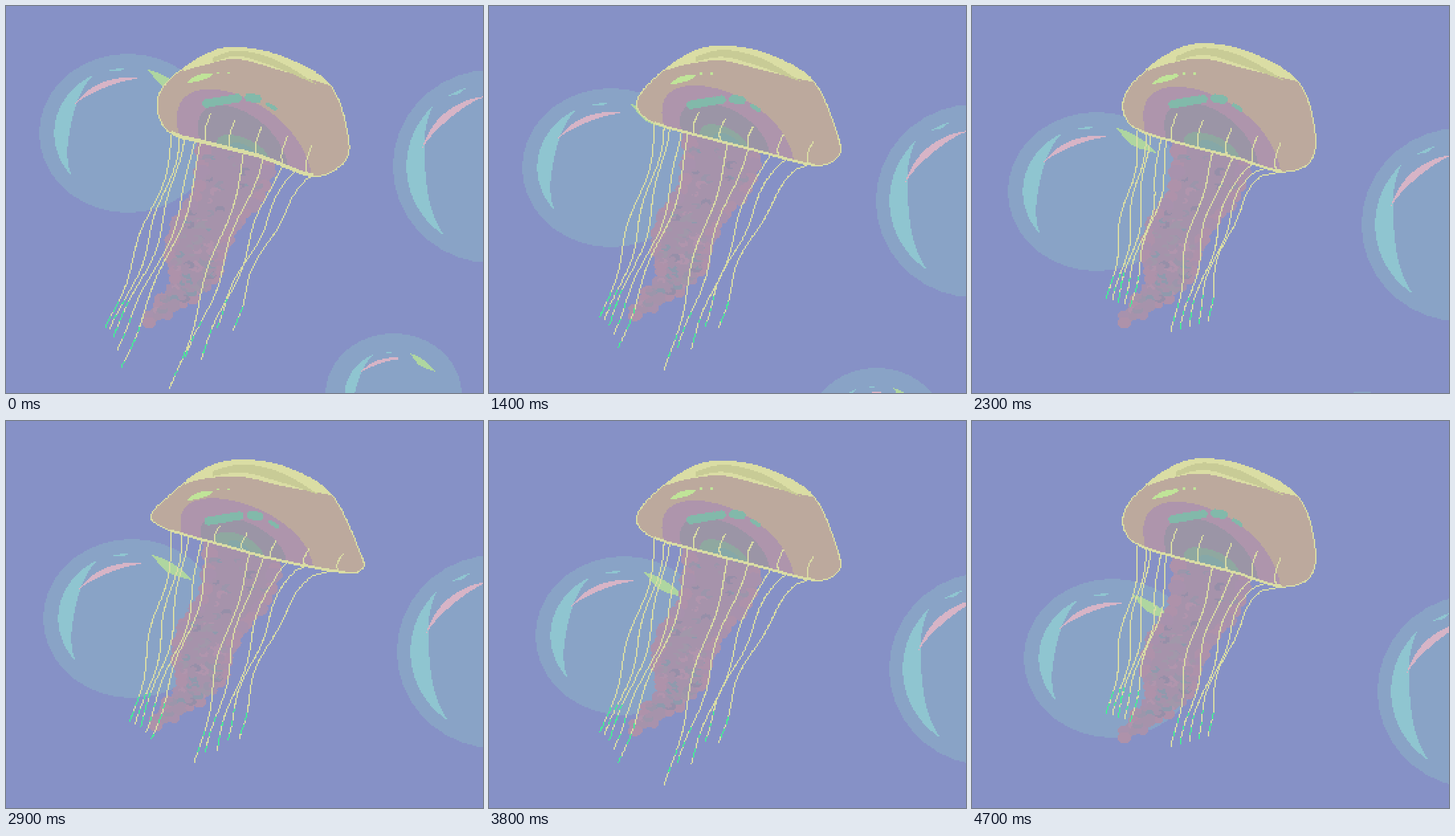
These frames come from a looping animation (720 by 584 pixels, 4.72 s). An HTML page with a canvas:

```html
<!DOCTYPE html>
<html lang="en">
<head>
<meta charset="utf-8">
<title>Jellyfish</title>
<style>
html, body { margin: 0; width: 100%; height: 100%; overflow: hidden; background: #8691c6; }
canvas { display: block; width: 100vw; height: 100vh; image-rendering: pixelated; }
</style>
</head>
<body>
<canvas width="360" height="292"></canvas>
<script>
const ctx = document.querySelector('canvas').getContext('2d');
const CELL = 2, LOOP = 4720, STEP = 100, STROKE = 12, SUB = 8;
const YELLOW = '#dadda4', TEAL = '#82b9aa', LIME = '#c0e498', CYAN = '#8fc5d0', PINK = '#d7b4c6', GREEN = '#afd6a0';
const { sin, cos, PI, min, max, floor, ceil, round, abs } = Math;

const points = s => s.split(' ').map(p => p.split(',').map(Number));
const mix = (a, b, f) => Array.isArray(a) ? a.map((v, i) => mix(v, b[i], f)) : a + (b - a) * f;
const range = (n, f) => Array.from({ length: n }, (_, i) => f(i));
const along = (path, t) => path[round(max(0, min(1, t)) * (path.length - 1))];

// Catmull-Rom curve, SUB samples per span
function smooth(pts, closed) {
  const n = pts.length, out = [];
  const at = i => closed ? pts[(i + n) % n] : pts[max(0, min(n - 1, i))];
  for (let i = 0; i < (closed ? n : n - 1); i++) {
    const [a, b, c, d] = [at(i - 1), at(i), at(i + 1), at(i + 2)];
    for (let k = 0; k < SUB; k++) {
      const t = k / SUB;
      out.push([0, 1].map(j => b[j] + t / 2 * (c[j] - a[j] +
        t * (2 * a[j] - 5 * b[j] + 4 * c[j] - d[j] + t * (3 * (b[j] - c[j]) + d[j] - a[j])))));
    }
  }
  if (!closed) out.push(pts[n - 1]);
  return out;
}

// Hard-edged scanline fill
function fill(pts, color) {
  ctx.fillStyle = color;
  const ys = pts.map(p => p[1] / CELL);
  const end = min(291, ceil(max(...ys)));
  for (let y = max(0, floor(min(...ys))); y <= end; y++) {
    const row = (y + .5) * CELL, xs = [];
    pts.forEach(([x, py], i) => {
      const [qx, qy] = pts[(i + 1) % pts.length];
      if (py <= row !== qy <= row) xs.push(round((x + (row - py) / (qy - py) * (qx - x)) / CELL));
    });
    xs.sort((a, b) => a - b);
    for (let i = 0; i + 1 < xs.length; i += 2) ctx.fillRect(xs[i], y, xs[i + 1] - xs[i], 1);
  }
}

function line(pts, colorAt, thick = 1) {
  for (let i = 0; i + 1 < pts.length; i++) {
    const [[x, y], [u, v]] = [pts[i], pts[i + 1]];
    const n = max(1, ceil(max(abs(u - x), abs(v - y)) / CELL));
    ctx.fillStyle = colorAt ? colorAt(i / pts.length, i) : YELLOW;
    for (let k = 0; k <= n; k++) {
      const [cx, cy] = mix([x, y], [u, v], k / n);
      ctx.fillRect(floor(cx / CELL), floor(cy / CELL) - thick + 1, 1, thick);
    }
  }
}

const oval = (x, y, rx, ry, color) =>
  fill(range(36, i => [x + rx * cos(i * PI / 18), y + ry * sin(i * PI / 18)]), color);

function bar(a, b, r, color) {
  for (let k = 0; k <= 8; k++) oval(...mix(a, b, k / 8), r, r, color);
}

// Bubbles: gleams are crescents given by two angles, a radius and a width
const gleams = [
  { from: 140, to: 242, r: .83, w: .18, color: CYAN },
  { from: 255, to: 268, r: .82, w: .03, color: CYAN },
  { from: 211, to: 281, r: .7, w: .07, color: PINK },
  { from: 285, to: 325, r: .83, w: .12, color: GREEN }
];
const bubbles = [
  { x: 184, y: 192, rx: 134, ry: 120, turn: 0, inset: 1 },
  { x: 734, y: 242, rx: 150, ry: 146, turn: -16, inset: 1.04 },
  { x: 585, y: 586, rx: 103, ry: 92, turn: 4, inset: .86 }
];
const driftTimes = [0, 7, 14, 23, 29, 38, 47];
const driftPath = points('0,0 2,16 0,52 4,88 6,106 20,132 28,166');

function driftAt(t) {
  const i = driftTimes.findLastIndex((k, j) => k <= t && j < driftTimes.length - 1);
  const f = (t - driftTimes[i]) / (driftTimes[i + 1] - driftTimes[i]);
  return mix(driftPath[i], driftPath[i + 1], f).map(v => round(v / CELL) * CELL);
}

function drawBubble({ x, y, rx, ry, turn, inset }, [dx, dy]) {
  oval(x + dx, y + dy, rx, ry, '#89a3c6');
  for (const { from, to, r, w, color } of gleams) {
    const edge = depth => range(25, i => {
      const a = (mix(from, to, i / 24) + turn) * PI / 180, q = (r - depth * sin(i * PI / 24)) * inset;
      return [x + dx + rx * q * cos(a), y + dy + ry * q * sin(a)];
    });
    fill([...edge(0), ...edge(w).reverse()], color);
  }
}

// The bell blends between three outlines, clockwise from the left end of the cap
const rest = points('240,118 300,74 348,63 418,77 490,120 517,200 508,238 462,257 388,230 310,210 250,193 229,158');
const wide = points('244,115 300,72 355,59 425,71 492,112 535,200 538,222 510,229 412,211 326,188 250,166 219,145');
const tall = points('240,122 290,68 350,46 420,57 497,102 519,165 514,230 475,236 408,227 314,202 250,175 226,157');

// One stroke: the bell opens, snaps tall and settles, while the threads gather
function poseAt(p) {
  const open = p < 7 ? sin(PI / 2 * p / 5) : 0;
  const lift = p < 7 ? 0 : 1 - (p - 7) / 6;
  const gather = 1 - (1 - p / 11) ** 2;
  const keys = rest.map((pt, i) => pt.map((v, j) => v + open * (wide[i][j] - v) + lift * (tall[i][j] - v)));
  const bell = smooth(keys, true);
  return { open, lift, gather, keys, bell, rim: bell.slice(7 * SUB, 10 * SUB + 1).reverse() };
}

let seed = 7;
const rand = () => (seed = seed * 16807 % 2147483647) / 2147483647;
const shades = ['#968fa8', '#9c96ab', '#b095ad', '#8f9aad', '#a198aa'];
const mottles = range(75, i => ({
  u: rand() * .92, v: .12 + rand() * .76, r: 4 + rand() * 6, tilt: rand() * 2 * PI, color: shades[i % 5]
}));
const spineKeys = points('350,205 338,280 302,330 286,375 281,418 216,478');

function drawArms({ open, gather }) {
  const spine = smooth(spineKeys.map(([x, y]) => [x + 14 * gather, y - 18 * open]));
  const at = (u, v) => {
    const [x, y] = along(spine, u);
    return [x + (2 * v - 1) * (56 * (1 - u ** 1.5) ** .5 + 2), y];
  };
  const base = '#a693ab';
  const edge = v => range(41, i => at(i / 40, v));
  fill([...edge(0), ...edge(1).reverse()], base);
  for (let i = 0; i <= 22; i++) {
    const u = i / 22, size = 12 - 4 * u + 2 * sin(i * 2.4);
    for (const v of [.06, .94]) oval(...at(u, v), size, size * .85, i % 3 ? '#ae92aa' : '#a892ad');
  }
  for (const { u, v, r, tilt, color } of mottles) {
    const [x, y] = at(u, v);
    oval(x, y, r, r * .7, color);
    oval(x + r * .5 * cos(tilt), y + r * .5 * sin(tilt), r * .7, r * .45, base);
  }
}

function drawBell({ open, lift, keys, bell, rim }) {
  const span = (a, b) => bell.slice(a * SUB, b * SUB + 1);
  const center = .55 - .1 * open, width = rim.at(-1)[0] - rim[0][0];

  function dome(half, height, color) {
    const from = center - half / width, to = center + half / width;
    const a = along(rim, from), b = along(rim, to);
    const arch = range(33, i => {
      const [x, y] = mix(a, b, (1 - cos(i * PI / 32)) / 2), s = abs(sin(i * PI / 32)) ** .8;
      return [x - .22 * height * s, y - height * s];
    });
    fill([...arch, ...range(12, i => along(rim, mix(to, from, i / 11)))], color);
  }

  fill(bell, '#bca99d');
  const drop = 17 + 8 * open + 15 * lift;
  const fold = [mix(keys[0], keys[1], .45), [keys[1][0], keys[1][1] + 15],
    [keys[2][0], keys[2][1] + drop], [keys[3][0] - 8, keys[3][1] + drop + 2], keys[4]];
  fill([...span(0, 4).slice(4), ...smooth(fold).reverse()], YELLOW);
  const band = f => smooth([1, 2, 3, 4].map(i => mix(keys[i], fold[i], f)).map(([x, y], i) => [x + 12 - 10 * i, y]));
  fill([...band(.25), ...band(.75).reverse()], '#c8cb96');

  dome(97, 97 - 22 * open - 8 * lift, '#ae95ac');
  dome(64, 73 - 24 * open, '#9b95a6');
  dome(37, 26 + 6 * lift, '#8fa8a0');
  dome(18, 15 + 8 * lift, '#86a8a8');
  line([...bell, bell[0]]);
  line(rim, null, round(3 - open - 2 * lift));

  const dy = 4 * max(open, lift), dx = 3 * open;
  bar([303 + dx, 147 + dy], [349 + dx, 139 + dy], 6.5, TEAL);
  bar([367 + dx, 138 + dy], [379 + dx, 140 + dy], 6.5, TEAL);
  bar([395 + dx, 148 + dy], [406 + dx, 155 + dy], 3, TEAL);
  fill(smooth(points('273,116 290,104 311,102 302,110').map(([x, y]) => [x, y + dy]), true), LIME);
  for (const x of [320, 336]) oval(x, 101 + dy / 2, 2.2, 2, LIME);

  for (let k = 0; k < 5; k++) {
    const [x, y] = along(rim, .28 + .17 * k), h = 44 - 17 * open - 6 * lift;
    line(smooth([[x + 7, y - h], [x - 1, y - h * .45], [x, y]]));
  }
}

function drawThread(root, tip, power, k) {
  const path = range(41, i => {
    const u = i / 40;
    return [mix(root[0], tip[0], u ** power) + 7 * sin(PI * u) * sin(9 * u + 1.3 * k), mix(root[1], tip[1], u)];
  });
  line(path, (f, i) => f > .8 && f < .96 && sin(i * 2 + k * 3) > .2 ? '#46ec96' : YELLOW);
}

function drawThreads({ open, gather, rim }) {
  for (let k = 0; k < 5; k++) {
    const left = mix([150 + 6 * k, 484 + 3.8 * k * k], [203 + 9 * k, 440 + 3 * k], gather);
    const right = mix([247 + 24 * k, 564 - 22 * k + 13 * (-1) ** k], [300 + 14 * k, 490 - 4 * k], gather);
    drawThread(along(rim, .01 + .065 * k), left, 1.35, k);
    drawThread(along(rim, .56 - .08 * open + .11 * k), right, 1.2 - .3 * gather - .13 * k, k + 5);
  }
}

function draw(frame) {
  ctx.fillStyle = '#8691c6';
  ctx.fillRect(0, 0, 360, 292);
  const drift = driftAt(frame);
  bubbles.forEach(b => drawBubble(b, drift));
  const pose = poseAt(frame % STROKE);
  drawArms(pose);
  drawBell(pose);
  drawThreads(pose);
}

let shown = -1;
const start = performance.now();
function tick() {
  const frame = floor((performance.now() - start) % LOOP / STEP);
  if (frame !== shown) draw(shown = frame);
  requestAnimationFrame(tick);
}
tick();
</script>
</body>
</html>
```
